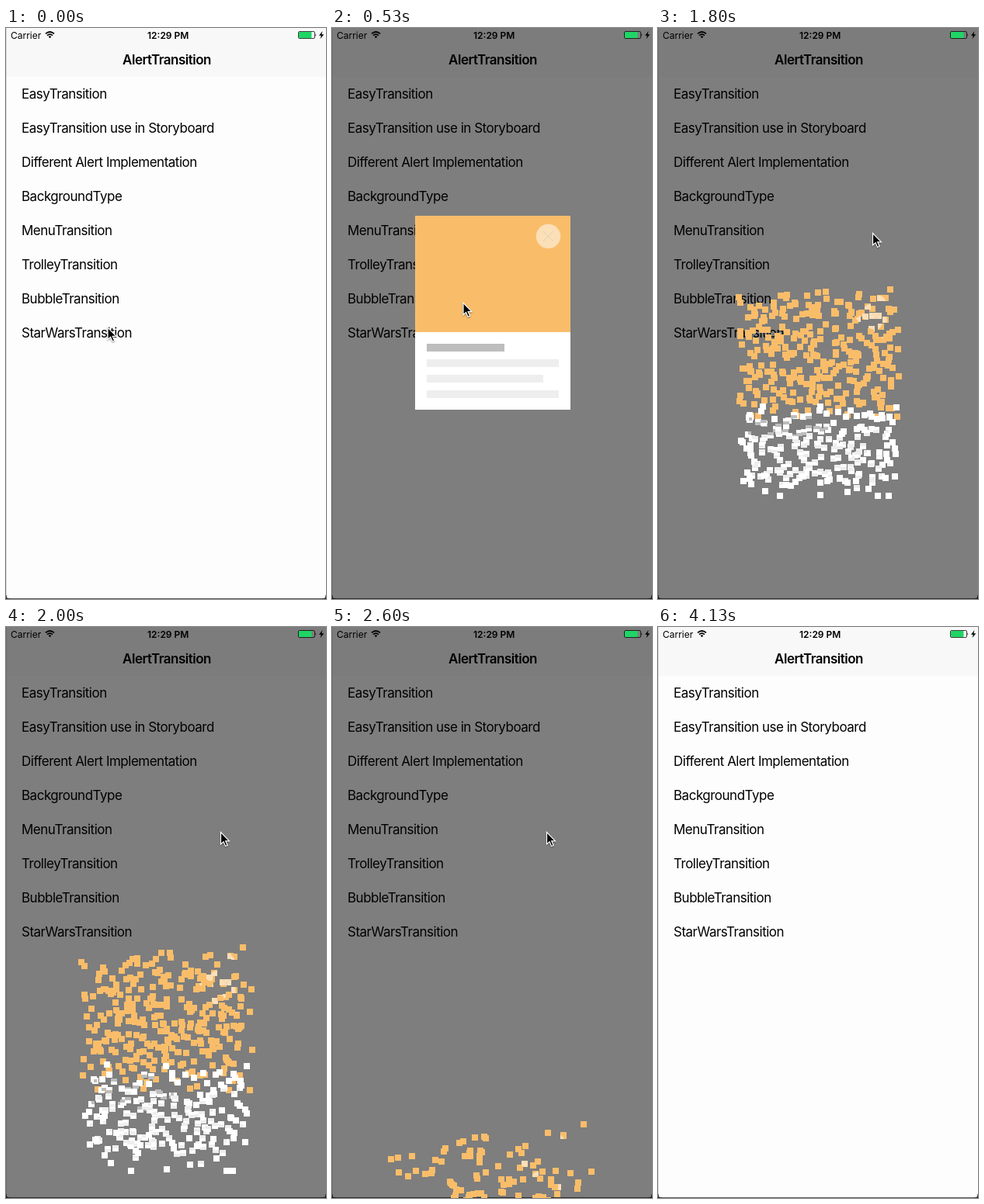
These frames come from a looping animation (412x736 px, 4.19 s). An HTML page with a canvas:

```html
<!DOCTYPE html>
<html lang="en">
<head>
<meta charset="utf-8">
<title>AlertTransition</title>
<style>
  html, body { margin: 0; width: 100%; height: 100%; overflow: hidden; background: #fdfdfd; }
  svg, canvas { position: absolute; left: 0; top: 0; display: block; }
  text { font-family: Inter, Roboto, sans-serif; fill: #000; }
  .row, .title { font-size: 17px; letter-spacing: -0.5px; }
  .title, .clock { font-weight: 600; text-anchor: middle; }
  .carrier, .clock { font-size: 12px; }
</style>
</head>
<body>
<svg id="page" width="412" height="736">
  <rect width="412" height="736" fill="#fdfdfd"/>
  <rect width="412" height="63" fill="#f8f8f8"/>
  <path d="M.5 0V736" stroke="#d8d8d8"/>
  <path d="M0 735.5H412M0 731Q0 736 5 736H0ZM412 731Q412 736 407 736H412Z" stroke="#333" stroke-width=".8" fill="#222"/>
  <text class="title" x="207" y="47">AlertTransition</text>
</svg>
<canvas id="stage" width="412" height="736"></canvas>
<svg id="status" width="412" height="20">
  <text class="carrier" x="6" y="14">Carrier</text>
  <g fill="none" stroke="#000" stroke-width="1.7">
    <path d="M51 7.4Q56.5 2.6 62 7.4M53 9.7Q56.5 6.7 60 9.7"/>
    <path d="M54.6 11L56.5 13.2L58.4 11Q56.5 9.5 54.6 11Z" fill="#000" stroke="none"/>
  </g>
  <text class="clock" x="208.7" y="14">12:29 PM</text>
  <rect x="376.5" y="4.5" width="21" height="9" rx="1.5" fill="none" stroke="#000" stroke-opacity=".75"/>
  <rect x="377" y="5" width="16.5" height="8" rx="1" fill="#1fd565"/>
  <path d="M398.5 7.2Q400.3 9 398.5 10.8Z"/>
  <path d="M407.5 4L403 9.7H405.8L404.6 14L409.3 8.2H406.4Z"/>
</svg>
<script>
const LOOP = 4190;
const CARD = { x: 107, y: 242, w: 200, h: 250 };
const TILE = 10, PIECE = 8, BURST = 1565;
const ROWS = ['EasyTransition', 'EasyTransition use in Storyboard',
  'Different Alert Implementation', 'BackgroundType', 'MenuTransition',
  'TrolleyTransition', 'BubbleTransition', 'StarWarsTransition'];

const page = document.getElementById('page');
ROWS.forEach((label, i) => {
  const row = document.createElementNS(page.namespaceURI, 'text');
  row.setAttribute('class', 'row');
  row.setAttribute('x', 20);
  row.setAttribute('y', 91 + 44 * i);
  row.textContent = label;
  page.append(row);
});

const ctx = document.getElementById('stage').getContext('2d');

const ease = (t, from, to) => {
  const u = Math.min(1, Math.max(0, (t - from) / (to - from)));
  return u * u * (3 - 2 * u);
};

function makeCard() {
  const card = document.createElement('canvas');
  card.width = CARD.w;
  card.height = CARD.h;
  const c = card.getContext('2d');
  const bar = (color, x, y, w, h) => { c.fillStyle = color; c.fillRect(x, y, w, h); };
  bar('#f9bd6a', 0, 0, 200, 150);
  bar('#fff', 0, 150, 200, 100);
  bar('#bdbdbd', 15, 165, 100, 10);
  [170, 150, 170].forEach((w, i) => bar('#eee', 15, 185 + 20 * i, w, 10));
  c.fillStyle = '#fbdfb7';
  c.beginPath();
  c.arc(171.5, 26.5, 15.7, 0, 7);
  c.fill();
  c.strokeStyle = '#dfd0b8';
  c.beginPath();
  c.moveTo(165, 20); c.lineTo(178, 33);
  c.moveTo(178, 20); c.lineTo(165, 33);
  c.stroke();
  return card;
}

function makeTiles() {
  let seed = 41;
  const rand = () => (seed = seed * 16807 % 2147483647) / 2147483647;
  const tiles = [];
  for (let y = 0; y < CARD.h; y += TILE)
    for (let x = 0; x < CARD.w; x += TILE)
      tiles.push({ x, y, vx: (rand() - 0.5) * 0.07, vy: 0.379 + rand() * 0.115 });
  return tiles;
}

const card = makeCard();
const tiles = makeTiles();

function drawTiles(dt) {
  const inset = (TILE - PIECE) / 2;
  for (const { x, y, vx, vy } of tiles) {
    const px = Math.round(CARD.x + x + inset + vx * dt);
    const py = Math.round(CARD.y + y + inset + vy * dt);
    if (py < 736) ctx.drawImage(card, x, y, TILE, TILE, px, py, PIECE, PIECE);
  }
}

const arrow = new Path2D('M0 0V15.5L3.6 12.2L6.1 18L8.7 16.9L6.2 11.3H11Z');

function drawCursor(t) {
  const k = ease(t, 280, 1030);
  ctx.save();
  ctx.translate(131 + 145.5 * k, 386 - 121.5 * k);
  ctx.shadowColor = 'rgba(0,0,0,.35)';
  ctx.shadowBlur = 2;
  ctx.shadowOffsetY = 1;
  ctx.fillStyle = '#000';
  ctx.strokeStyle = '#fff';
  ctx.lineWidth = 1.2;
  ctx.fill(arrow);
  ctx.stroke(arrow);
  ctx.restore();
}

function draw(t) {
  const shown = ease(t, 60, 320);
  ctx.clearRect(0, 0, 412, 736);
  ctx.fillStyle = `rgba(0,0,0,${0.5 * shown * (1 - ease(t, 3430, 3600))})`;
  ctx.fillRect(0, 0, 412, 736);
  if (t < BURST) {
    ctx.globalAlpha = shown;
    ctx.drawImage(card, CARD.x, CARD.y);
    ctx.globalAlpha = 1;
  } else {
    drawTiles(t - BURST);
  }
  if (t < 2960) drawCursor(t);
}

const start = performance.now();
function tick() {
  draw((performance.now() - start) % LOOP);
  requestAnimationFrame(tick);
}
tick();
</script>
</body>
</html>
```
